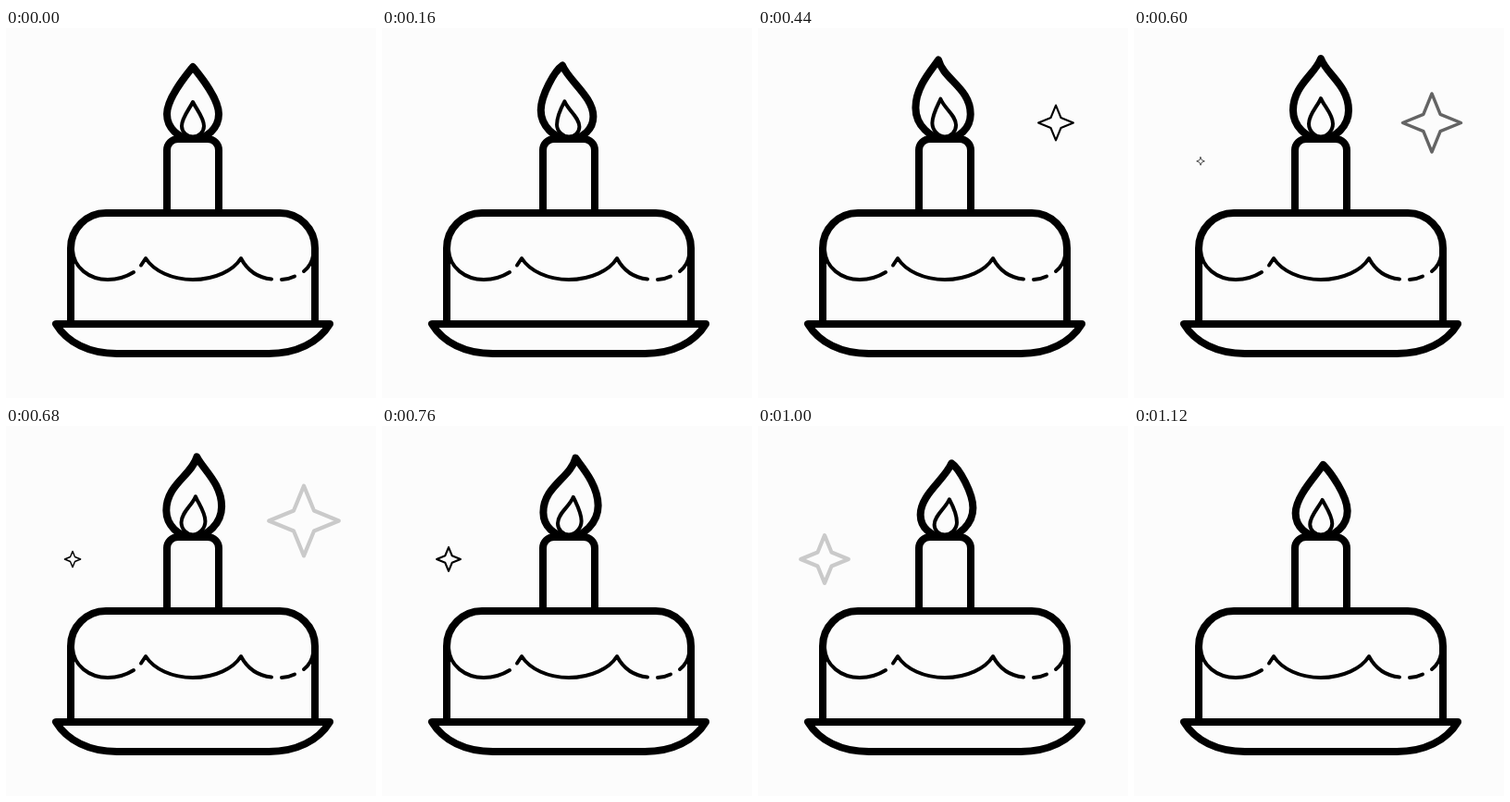
Recreate the animation shown at these times as an HTML page. Size 400x400 px, loop 1.16 s.

```html
<!DOCTYPE html>
<html lang="en">
<head>
<meta charset="utf-8">
<title>Birthday cake</title>
<style>
  html, body { margin: 0; width: 100%; height: 100%; overflow: hidden; background: #fcfcfc; }
  svg { display: block; width: 100%; height: 100%; }
  path { fill: none; stroke: #000; stroke-width: 8; stroke-linecap: round; stroke-linejoin: round; }
  .thin { stroke-width: 4; }
  .star { stroke-width: 4.5; }
</style>
</head>
<body>
<svg viewBox="0 0 400 400">
  <!-- candle, cake, plate -->
  <path d="M174 200V132a12 12 0 0 1 12-12h32a12 12 0 0 1 12 12v68"/>
  <path d="M70 320V238a38 38 0 0 1 38-38h188a38 38 0 0 1 38 38v82"/>
  <path d="M54 320H350C338 340 314 352 284 352H120C90 352 66 340 54 320Z"/>
  <!-- icing -->
  <path class="thin" d="M72 240C73 259 90 272 110 272C120 272 130 269 138 264
    M146 256.5L151 249C160 263 180 272 202 272C226 272 246 262 254 249C261 262 272 270 287 271.5
    M298 272Q306 271.500 312 268.500M322 263C327 259 331 253 332 246"/>
  <path id="flame"/>
  <path id="core" class="thin"/>
  <path id="starRight" class="star"/>
  <path id="starLeft" class="star"/>
</svg>
<script>
const LOOP = 1160, STEP = 40, HALF = 600;
const CX = 202;
const $ = id => document.getElementById(id);
const mix = (a, b, k) => a + (b - a) * k;

// Each row: half-width and y at rest, half-width and y stretched, lean in x, lean in y.
const OUTER = {
  tip: [0, 42, 0, 33, 9, 0],
  neck: [8, 52, 6, 50, 10, 7],
  hip: [28, 76, 30, 62, 2.5, 1],
  side: [28, 93, 30, 89, 2.5, 4.5],
  base: 120, round: 15.5
};
const INNER = {
  tip: [0, 80, 0, 76, 6, 0],
  neck: [4, 88, 3, 84, 5, 3],
  hip: [12, 97, 13, 93, 1, 0.5],
  side: [12, 106, 13, 103.5, 1, 1.5],
  base: 117.5, round: 6.5
};

function flamePath(f, stretch, lean) {
  const at = ([w0, y0, w1, y1, dx, dy], side) => [
    CX + side * mix(w0, w1, stretch) + lean * dx,
    mix(y0, y1, stretch) - side * lean * dy
  ];
  const tip = at(f.tip, 1);
  const [rn, rh, rs] = [f.neck, f.hip, f.side].map(p => at(p, 1));
  const [ln, lh, ls] = [f.neck, f.hip, f.side].map(p => at(p, -1));
  const below = ([x, y]) => [x, mix(y, f.base, 0.55)];
  return `M${tip}C${rn} ${rh} ${rs}` +
    `C${below(rs)} ${CX + f.round} ${f.base} ${CX} ${f.base}` +
    `C${CX - f.round} ${f.base} ${below(ls)} ${ls}` +
    `C${lh} ${ln} ${tip}Z`;
}

function starPath(r) {
  const q = r * 0.29;
  return `M0 ${-r}L${q} ${-q}L${r} 0L${q} ${q}L0 ${r}L${-q} ${q}L${-r} 0L${-q} ${-q}Z`;
}

const stars = [
  { el: $("starRight"), x: 322, y: 102.5, r: 41, start: 200 },
  { el: $("starLeft"), x: 72, y: 144, r: 28, start: 520 }
];
stars.forEach(s => s.el.setAttribute("d", starPath(s.r)));

// Grows for 520 ms, fading over the last 200.
function drawStar({ el, x, y, start }, t) {
  const age = t - start;
  const shown = age > 0 && age < 520;
  el.style.display = shown ? "" : "none";
  if (!shown) return;
  el.setAttribute("transform", `translate(${x} ${y}) scale(${age / 520})`);
  el.setAttribute("opacity", Math.min(1, (520 - age) / 200));
}

function draw(t) {
  const phase = Math.PI * (t < HALF ? t / HALF : 1 + (t - HALF) / (LOOP - HALF));
  const s = Math.sin(phase);
  const lean = -Math.sign(s) * Math.abs(s) ** 0.87;
  const stretch = (1 - Math.cos(phase)) / 2;
  $("flame").setAttribute("d", flamePath(OUTER, stretch, lean));
  $("core").setAttribute("d", flamePath(INNER, stretch, lean));
  stars.forEach(star => drawStar(star, t));
}

const begin = performance.now();
function tick() {
  const t = (performance.now() - begin) % LOOP;
  draw(Math.floor(t / STEP) * STEP);
  requestAnimationFrame(tick);
}
tick();
</script>
</body>
</html>
```
